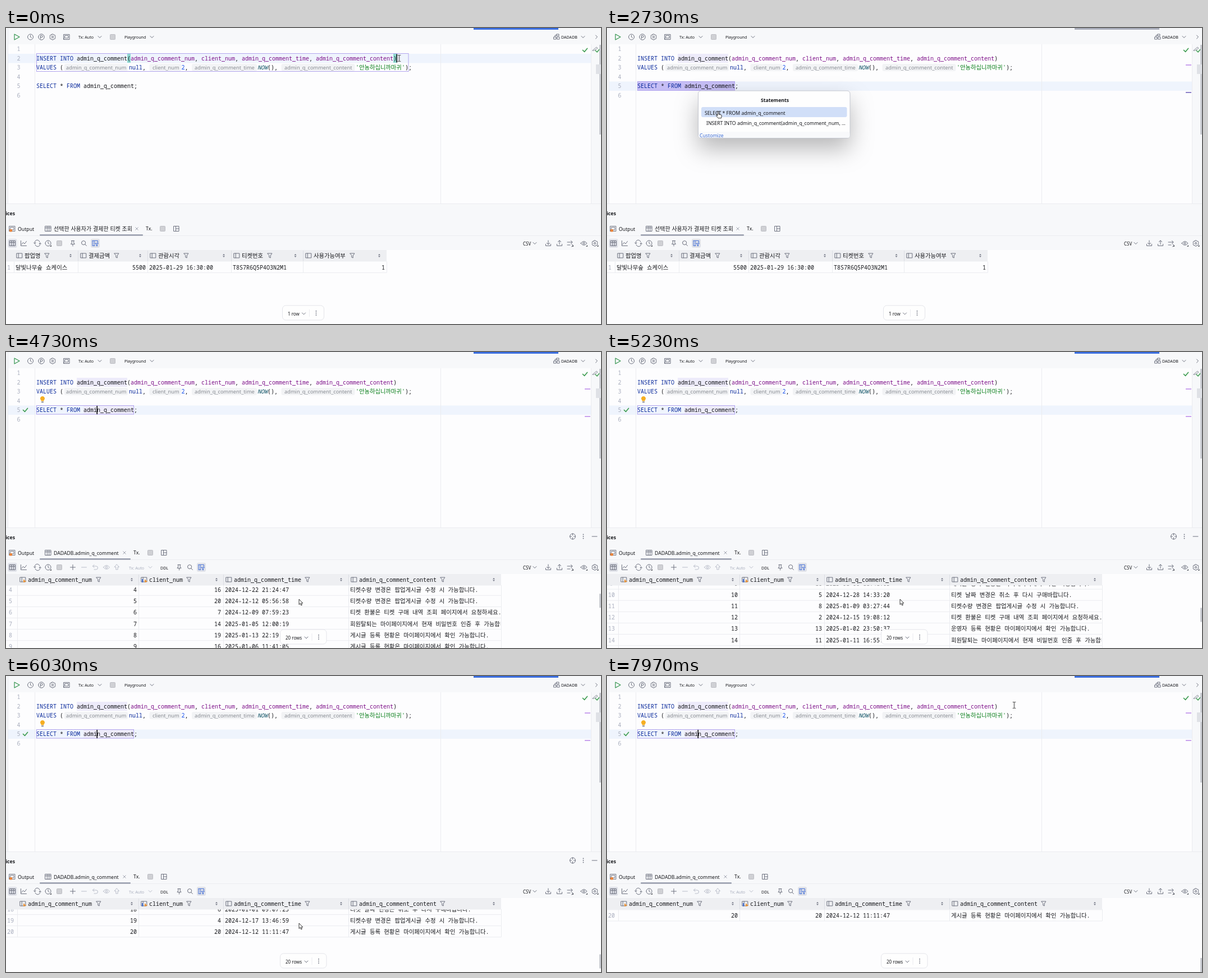
Recreate the animation shown at these times as an HTML page. Size 1060 px wide and 528 px high, loop 8 s.

```html
<!DOCTYPE html>
<html lang="ko">
<head>
<meta charset="utf-8">
<title>Query console</title>
<style>
html, body { margin: 0; width: 100%; height: 100%; overflow: hidden; background: #fdfdfe; }
svg { display: block; width: 1060px; height: 528px; }
text { white-space: pre; fill: #17181c; }
.mono { font: 10px "Noto Sans Mono", "Liberation Mono", monospace; }
.ko { font: 10.4px "Noto Sans Mono", "Noto Sans CJK KR", "Noto Sans CJK", monospace; }
.kh { font: 10.3px "Noto Sans CJK KR", "Noto Sans CJK", sans-serif; }
.tab { font: 10px "Noto Sans CJK KR", "Noto Sans CJK", sans-serif; }
.ui { font: 8.7px "Noto Sans", "Open Sans", sans-serif; }
.sm { font: 7.1px "Noto Sans", "Open Sans", sans-serif; }
.md { font: 8px "Noto Sans", "Open Sans", sans-serif; }
.hint { font: 9.25px "Noto Sans", "Open Sans", sans-serif; fill: #868a91; }
.bold { font-weight: 700; }
.dim { fill: #a8adbd; }
.end { text-anchor: end; }
.mid { text-anchor: middle; }
.kw { fill: #0a2a9c; }
.col { fill: #7d0f88; }
.str { fill: #067d17; }
.num { fill: #1750eb; }
.link { fill: #3f6fd6; }
.fn { font-style: italic; fill: #00485c; }
.ic { fill: none; stroke: #6c707e; stroke-width: 1; stroke-linejoin: round; stroke-linecap: round; }
.popup-box { filter: drop-shadow(0 19px 20px rgba(0, 0, 0, .27)); }
#mouse { animation: move 8s linear infinite; }
#rows { animation: scroll 8s linear infinite; }
#thumb { animation: thumb 8s linear infinite; }
.blink { animation: blink 1s step-end -.35s infinite; }
@keyframes blink { 0% { opacity: 1 } 50%, 100% { opacity: 0 } }
@keyframes scroll {
  0%, 54% { transform: translateY(0) }
  59.125% { transform: translateY(-62.8px) }
  70% { transform: translateY(-257.1px) }
  77%, 100% { transform: translateY(-381.9px) }
}
@keyframes thumb {
  0%, 54% { transform: translateY(0) }
  59.125% { transform: translateY(14.2px) }
  70% { transform: translateY(58px) }
  77%, 100% { transform: translateY(86px) }
}
@keyframes move {
  0% { transform: translate(700.5px, 54px) }
  4% { transform: translate(700.5px, 54px); animation-timing-function: ease-in-out }
  11% { transform: translate(162px, 102px) }
  15% { transform: translate(162px, 102px); animation-timing-function: ease-in }
  17.875% { transform: translate(148.5px, 97px); animation-timing-function: ease-out }
  23.5% { transform: translate(19px, 16px) }
  28% { transform: translate(19px, 16px); animation-timing-function: ease-in-out }
  33.5%, 44.5% { transform: translate(198px, 149px); animation-timing-function: ease-in-out }
  52% { transform: translate(522px, 441px) }
  87% { transform: translate(522px, 441px); animation-timing-function: ease-in-out }
  98%, 100% { transform: translate(725.5px, 52px) }
}
</style>
</head>
<body>
<script>
const LOOP = 8000, CLICK = 1120, OPEN = 2050, CLOSE = 3530, DONE = 3750;

// Time windows in ms during which each group is visible
const phases = {
  line2: [[0, CLICK]],
  caret2: [[0, 500], [1000, CLICK]],
  line5: [[CLICK, LOOP]],
  caret5: [[CLICK, 1620]],
  insertBox: [[0, OPEN]],
  popup: [[OPEN, CLOSE]],
  focus: [[0, OPEN], [CLOSE, LOOP]],
  selectBox: [[CLOSE, LOOP]],
  before: [[0, DONE]],
  after: [[DONE, LOOP]],
  bulb: [[4250, LOOP]],
  hover: [[3900, 7290]],
  ibeam: [[0, 1800], [CLOSE, 3900], [7290, LOOP]],
  arrow: [[1800, 2560], [3900, 7290]],
  hand: [[2560, CLOSE]]
};
const pct = t => t / LOOP * 100 + '%';
const css = Object.entries(phases).map(([name, spans]) => {
  const first = spans[0][0] ? '0%{visibility:hidden}' : '';
  const steps = spans.map(([a, b]) =>
    `${pct(a)}{visibility:visible}` + (b < LOOP ? `${pct(b)}{visibility:hidden}` : '')).join('');
  return `@keyframes ${name}{${first}${steps}}.${name}{animation:${name} 8s step-end infinite}`;
}).join('\n');
document.head.appendChild(document.createElement('style')).textContent = css;

const ring = r => `M${-r} 0a${r} ${r} 0 1 0 ${2 * r} 0a${r} ${r} 0 1 0 ${-2 * r} 0`;
const shapes = {
  run: 'M-4-5L5 0L-4 5Z',
  clock: ring(5) + 'M0-3V0L2 1.4',
  plan: ring(5.2) + 'M-1.5 3V-2.7H.6a1.7 1.7 0 0 1 0 3.4H-1.5',
  gear: 'M-1.2-5H1.2L2-3.5L4-3.6L5-1.4L4.1 0L5 1.4L4 3.6L2 3.5L1.2 5H-1.2L-2 3.5L-4 3.6L-5 1.4L-4.1 0L-5-1.4L-4-3.6L-2-3.5Z' + ring(1.6),
  frame: 'M-5-4.5H5V4.5H-5ZM-3-2.5H3V2H-3ZM-5 2V4.5',
  chev: 'M-3-1.5L0 1.5L3-1.5',
  next: 'M-1.5-3L1.5 0L-1.5 3',
  nodes: 'M-5 0H-1V4H-5ZM1 0H5V4H1ZM0-5H4V-2H0ZM-3 0V-3H0',
  tick: 'M-4 0L-1 3L4-3',
  pen: 'M-5 3L2-3L4-1L-2 3Z',
  funnel: 'M-4-4H4L1.2 0V4L-1.2 3V0Z',
  column: 'M-4.8-4H4.8V4H-4.8ZM-1.8-4V4',
  table: 'M-5-4.5H5V4.5H-5ZM-5-1.5H5M-1.7-4.5V4.5M1.7-4.5V4.5',
  layout: 'M-4.5-4.5H4.5V4.5H-4.5ZM-1-4.5V4.5M-1 0H4.5',
  chart: 'M-5-4.5V4.5H5M-3.5 2L-1-1.5L1.5 1L5-3.5',
  reload: 'M-4.7 0A4.5 4.5 0 0 1 4-2.5M4.7 0A4.5 4.5 0 0 1-4 2.5M-6.5-1L-4.7 1L-3-1M3 1L4.7-1L6.5 1',
  pin: 'M-2.5-4.5H2.5M-1.7-4.5V-1L-3.5 1.5H3.5L1.7-1V-4.5M0 1.5V5',
  search: 'M-4.5-.8a3.6 3.6 0 1 0 7.2 0a3.6 3.6 0 1 0-7.2 0M1.8 1.9L4.5 4.6',
  sift: 'M-5-4.5H4.5V-1M-5-4.5V4.5H-1M-2-4.5V4.5M0 0H5.5L3.5 2.3V5L2 4.5V2.3Z',
  plus: 'M-4.5 0H4.5M0-4.5V4.5',
  minus: 'M-4.5 0H4.5',
  undo: 'M-2-4.5L-4.5-2L-2 .5M-4.5-2H1.5a3 3 0 0 1 0 6H-2',
  eye: 'M-5.5 0Q0-7 5.5 0Q0 7-5.5 0Z' + ring(1.7),
  up: 'M0-5L4-.5H1.7V4H-1.7V-.5H-4Z',
  load: 'M0-5V2M-2.7-.5L0 2L2.7-.5M-4.5 1.5V4.5H4.5V1.5',
  save: 'M0 2V-5M-2.7-2.5L0-5L2.7-2.5M-4.5 1.5V4.5H4.5V1.5',
  swap: 'M-5-2H4M1.5-4.5L4-2L1.5 .5M0 3H-5M2.5 1L5 3.5L2.5 6',
  cross: 'M-2.3-2.3L2.3 2.3M2.3-2.3L-2.3 2.3',
  target: ring(5) + 'M0-5V-2M0 5V2M-5 0H-2M5 0H2'
};
const icon = (name, x, y, color = '#6c707e', width = 1) =>
  `<path class="ic" transform="translate(${x} ${y})" d="${shapes[name]}" style="stroke:${color};stroke-width:${width}"/>`;
const text = (x, y, s, cls = 'ui') => `<text x="${x}" y="${y + 3.5}" class="${cls}">${s}</text>`;
const rect = (x, y, w, h, fill, more = '') =>
  `<rect x="${x}" y="${y}" width="${w}" height="${h}" fill="${fill}" ${more}/>`;
const line = (x1, y1, x2, y2, color = '#ebecf0') =>
  `<path d="M${x1} ${y1}L${x2} ${y2}" stroke="${color}" fill="none"/>`;
const group = (phase, ...parts) => `<g class="${phase}">${parts.join('')}</g>`;
const span = (cls, s) => `<tspan class="${cls}">${s}</tspan>`;
const stop = (x, y) => rect(x - 4.5, y - 4.5, 9, 9, '#cfd0d4', 'rx="1" stroke="#bcbdc3"');
const dots = (x, y) => [-3.5, 0, 3.5].map(d => `<circle cx="${x}" cy="${y + d}" r=".9" fill="#6c707e"/>`).join('');
const sorter = (x, y) => `<path transform="translate(${x} ${y})" d="M-2-.8L0-3L2-.8ZM-2 .8L0 3L2 .8Z" fill="#6c707e"/>`;
// Small corner mark of a button that opens a menu
const more = (x, y) => `<path transform="translate(${x} ${y})" d="M6 3V6H3Z" fill="#55585f"/>`;
const outline = (x, y, w, h) => rect(x, y, w, h, 'none', 'stroke="#b3a6ee"');
const tint = (x, y) => rect(x, y, 90, 16, '#edebfa');

const PANEL = '#f7f8fa', GREEN = '#3f9d52';

function backdrop() {
  return rect(0, 0, 1060, 528, '#fdfdfe') + rect(0, 0, 1060, 29, PANEL) +
    rect(0, 29, 3, 285, PANEL) + rect(1043, 29, 17, 285, PANEL) + line(3.5, 0, 3.5, 313) +
    group('line2', rect(4, 46, 1038, 16.5, '#eff4fd')) +
    group('line5', rect(4, 95.5, 1038, 16.5, '#eff4fd')) +
    line(51.5, 29, 51.5, 313) + line(774.5, 29, 774.5, 313) + line(1042.5, 29, 1042.5, 313) +
    rect(833, 0, 151, 3, '#a9adba') + group('focus', rect(833, 0, 151, 3, '#3a6ee0'));
}

function topBar() {
  return icon('run', 19, 16, '#369650', 1.2) + icon('clock', 43.5, 16) + icon('plan', 63, 16) +
    icon('gear', 83, 16) + icon('frame', 108, 16) + text(129, 15.5, 'Tx: Auto', 'sm') + icon('chev', 167, 16) +
    stop(190, 16) + text(211, 15.5, 'Playground', 'sm') + icon('chev', 260, 16) +
    icon('nodes', 981, 16) + text(989, 15.5, 'DADADB', 'sm') + icon('chev', 1028, 16) + icon('next', 1052, 16) +
    icon('tick', 1031.5, 39.5, GREEN, 1.7) + icon('pen', 1050, 37, '#8b8f9a') + icon('tick', 1054, 40, GREEN, 1.5) +
    rect(1057, 30, 3, 160, '#c8cad0') + rect(1051, 65, 9, 17, '#dfe1e6');
}

function hints() {
  return [[104, 113, 107, 'admin_q_comment_num'], [255.5, 57, 261, 'client_num'],
    [331, 116, 336, 'admin_q_comment_time'], [490.5, 131, 496, 'admin_q_comment_content']]
    .map(([left, w, x, s]) => rect(left, 64, w, 13, '#f2f3f5', 'rx="3"') + text(x, 70, s, 'hint')).join('');
}

function editor() {
  const numbers = [1, 2, 3, 4, 5, 6].map(n => text(22.5, 21 + n * 16.5, n, 'mono dim mid')).join('');
  const marks = rect(1031, 65, 10, 2, '#c9a2ee') + rect(1031, 114, 10, 2, '#c9a2ee');
  return numbers +
    group('line2', rect(216, 46, 6, 16, '#8fd8d2'), rect(690, 46, 6, 16, '#8fd8d2')) +
    group('line5', tint(126, 46), tint(138, 95.5), marks) +
    group('popup', rect(54, 95, 174, 16.5, '#c6bef5'), outline(54.5, 95.5, 173, 16), rect(1031, 114, 10, 2, '#8c80c8')) +
    group('insertBox', outline(54.5, 45.5, 662.5, 32)) +
    group('selectBox', outline(54.5, 95.5, 173, 15.5)) +
    text(54, 54, span('kw', 'INSERT INTO') + ' admin_q_comment(' + span('col', 'admin_q_comment_num') + ', ' +
      span('col', 'client_num') + ', ' + span('col', 'admin_q_comment_time') + ', ' +
      span('col', 'admin_q_comment_content') + ')', 'mono') +
    text(54, 70.5, span('kw', 'VALUES') + ' (', 'mono') + hints() +
    text(219, 70.5, span('kw', 'null') + ',', 'mono') + text(312.5, 70.5, span('num', '2') + ',', 'mono') +
    text(448, 70.5, span('fn', 'NOW') + '(),', 'mono') + text(623, 70.5, "'", 'mono str') +
    text(629, 70.5, '안농하십니까마귀', 'kh str') + text(705, 70.5, span('str', "'") + ');', 'mono') +
    text(54, 103.5, span('kw', 'SELECT') + ' * ' + span('kw', 'FROM') + ' admin_q_comment;', 'mono') +
    group('caret2', rect(695.5, 46.5, 1.5, 15, '#000')) +
    group('caret5', rect(161.5, 96, 1.5, 15, '#000')) +
    group('selectBox', group('blink', rect(161.5, 96, 1.5, 15, '#000'))) +
    group('after', icon('tick', 34.5, 103.5, GREEN, 1.7)) +
    group('bulb', '<path d="M62.5 87.5V86A4 4 0 1 1 67.5 86V87.5Z" fill="#f5ae22"/>', rect(63, 88.3, 4, 2, '#8a8d96'));
}

function popup() {
  return group('popup',
    rect(162.5, 112, 270.5, 84.5, '#fefefe', 'rx="5" stroke="#c4c7d0" class="popup-box"'),
    rect(163, 185, 269.5, 11, '#f8f9fb', 'rx="4"'), rect(168, 141, 259.5, 18, '#d1dff8', 'rx="3"'),
    text(299, 128, 'Statements', 'ui bold mid'),
    text(174, 151, 'SELECT * FROM admin_q_comment'),
    text(177, 169, 'INSERT INTO admin_q_comment(admin_q_comment_num, ...'),
    text(165, 191, 'Customize', 'ui link'));
}

// Tab strip parts shift with the width of the open tab
function tabStrip(title, cls, close) {
  return text(85, 358, title, cls) + icon('cross', close, 358, '#a0a4b0') +
    rect(60, 368.3, close - 49, 2.2, '#8f95a6', 'rx="1"') + text(close + 16, 357.5, 'Tx.', 'ui') +
    stop(close + 46, 358) + icon('layout', close + 70.5, 358);
}

function panel() {
  const y = 384, gray = '#b9bdc9', lit = x => rect(x - 8, y - 8, 16, 16, '#dfe1e8', 'rx="3"');
  return rect(0, 314, 1060, 82, PANEL) + line(0, 313.5, 1060, 313.5) + line(0, 370.5, 1060, 370.5) +
    text(16, 330, 'ices', 'ui bold end') +
    group('hover', icon('target', 1009.5, 329), dots(1028.5, 329), icon('minus', 1048.5, 329)) +
    icon('frame', 11, 358, '#777b88') + rect(6, 359, 5, 4.5, '#e8843c', 'rx="1"') +
    text(21, 358, 'Output') + icon('table', 75, 358) +
    group('before', tabStrip('선택한 사용자가 결제한 티켓 조회', 'tab', 233)) +
    group('after', tabStrip('DADADB.admin_q_comment', 'ui', 211)) +
    lit(11.5) + icon('table', 11.5, y) + icon('chart', 31.5, y) + icon('reload', 56, y) +
    icon('clock', 75, y) + more(75, y) + stop(95, y) +
    group('before', icon('pin', 119, y), icon('search', 139, y), lit(159), icon('sift', 159, y, '#4571d8')) +
    group('after', icon('plus', 119, y), icon('minus', 139, y, gray), icon('undo', 159, y, gray),
      icon('eye', 179, y, gray), icon('up', 197.5, y, gray), text(219, y, 'Tx: Auto', 'sm dim'),
      icon('chev', 257, y, gray), text(275, y, 'DDL', 'sm'), icon('pin', 308.5, y), icon('search', 328, y),
      lit(348), icon('sift', 348, y, '#4571d8')) +
    text(921, y, 'CSV', 'md') + icon('chev', 942, y) + icon('load', 966, y) + icon('save', 986, y) +
    icon('swap', 1005, y) + more(1005, y) + icon('eye', 1029.5, y) + more(1030, y) +
    icon('gear', 1049, y) + more(1049.5, y);
}

// Each column: left edge, title, funnel x, sorter x
function header(cols, right, cls, badge = () => '') {
  return rect(0, 396, right, 20.5, '#eeeff2') + cols.map(([x, title, funnel, sort], i) =>
    (i ? line(x + .5, 397, x + .5, 416, '#dcdee4') : '') + icon('column', x + 10, 406) +
    text(x + 19, 406.5, title, cls) + icon('funnel', funnel, 406) + sorter(sort, 406) + badge(x, i)).join('');
}
const grid = (xs, right, top, h) => line(0, top + h, right, top + h) +
  xs.concat(right).map(x => line(x + .5, top, x + .5, top + h)).join('');

function pager(x, w, label) {
  return rect(x + .5, 495, w, 26, '#fefefe', 'rx="6" stroke="#e4e5ea"') + text(x + 10, 509, label, 'md') +
    icon('chev', x + w - 35.5, 509.5) + line(x + w - 25.5, 502, x + w - 25.5, 515) + dots(x + w - 13.5, 508.5);
}

function ticketTable() {
  const y = 427.5;
  const cols = [[14, '팝업명', 73, 115], [128, '결제금액', 197, 239], [252, '관람시각', 321, 388],
    [401, '티켓번호', 470, 515.5], [529, '사용가능여부', 617, 665]];
  return header(cols, 678, 'kh') + grid(cols.map(c => c[0]), 678, 416.5, 20) +
    text(5, y, 1, 'mono dim mid') + text(17, y, '달빛나무숲 쇼케이스', 'ko') + text(249, y, '5500', 'mono end') +
    text(255, y, '2025-01-29 16:30:00', 'mono') + text(404, y, 'T8S7R6Q5P4O3N2M1', 'mono') +
    text(675, y, '1', 'mono end') + pager(492, 74, '1 row');
}

const notes = {
  a: '티켓수량 변경은 팝업게시글 수정 시 가능합니다.',
  b: '티켓 환불은 티켓 구매 내역 조회 페이지에서 요청하세요.',
  c: '회원탈퇴는 마이페이지에서 현재 비밀번호 인증 후 가능합니다.',
  d: '게시글 등록 현황은 마이페이지에서 확인 가능합니다.',
  e: '티켓 날짜 변경은 취소 후 다시 구매바랍니다.',
  f: '운영자 등록 현황은 마이페이지에서 확인 가능합니다.'
};
const comments = `3 2025-01-08 10:21:36 e
12 2024-12-19 18:40:02 b
9 2025-01-03 08:15:51 d
16 2024-12-22 21:24:47 a
20 2024-12-12 05:56:58 a
7 2024-12-09 07:59:23 b
14 2025-01-05 12:00:19 c
19 2025-01-13 22:19:34 d
16 2025-01-06 11:41:05 d
5 2024-12-28 14:33:20 e
8 2025-01-09 03:27:44 a
2 2024-12-15 19:08:12 b
13 2025-01-02 23:50:37 f
11 2025-01-11 16:55:48 c
1 2024-12-23 02:31:06 c
1 2024-12-22 06:26:34 e
17 2024-12-31 09:09:11 f
6 2025-01-01 09:07:25 e
4 2024-12-17 13:46:59 a
20 2024-12-12 11:11:47 d`.split('\n').map(r => r.split(' '));

function commentTable() {
  const cols = [[20, 'admin_q_comment_num', 165, 224], [236, 'client_num', 326, 375],
    [387, 'admin_q_comment_time', 537, 597], [610, 'admin_q_comment_content', 778, 869]];
  const xs = cols.map(c => c[0]);
  const keys = (x, i) => i > 1 ? '' : rect(x + 11, 406, 2, 5, '#e8943a') + rect(x + 13, 408, 2.5, 2, '#e8943a') +
    (i ? rect(x + 6, 405, 2, 6, '#4571d8') : '');
  const rows = comments.map(([client, day, time, note], i) => {
    const y = 427.5 + i * 20.1;
    return grid(xs, 882, y - 10.6, 20.1) + text(8, y, i + 1, 'mono dim mid') + text(233, y, i + 1, 'mono end') +
      text(383, y, client, 'mono end') + text(390, y, day + ' ' + time, 'mono') +
      `<g clip-path="url(#cell)">${text(613, y, notes[note], 'ko')}</g>`;
  }).join('');
  return `<g clip-path="url(#view)"><g id="rows">${rows}</g></g>` + header(cols, 882, 'mono', keys) +
    `<g id="thumb">${rect(1057, 417, 3, 25, '#c8cad0')}</g>` + pager(488, 82.5, '20 rows');
}

function pointer() {
  return '<g id="mouse">' +
    group('ibeam', '<path d="M-2.5-5.5H-.7L0-4.8L.7-5.5H2.5M0-4.8V4.8M-2.5 5.5H-.7L0 4.8L.7 5.5H2.5" fill="none" stroke="#222"/>') +
    group('arrow', '<path d="M0 0V9.5L2.2 7.5L3.8 11L5.4 10.2L3.9 7H6.8Z" fill="#fff" stroke="#222" stroke-width=".9"/>') +
    group('hand', '<path d="M-1 1a1 1 0 0 1 2 0V5L5 5.8Q6.5 6.2 6.3 8L5.5 11.8H0L-3.5 7.5Q-3.6 6-2.2 6.5L-1 7.6Z" fill="#fff" stroke="#222" stroke-width=".9"/>') +
    '</g>';
}

document.body.innerHTML = `<svg viewBox="0 0 1060 528" xmlns="http://www.w3.org/2000/svg">
<defs><clipPath id="view"><rect y="416" width="1060" height="112"/></clipPath>
<clipPath id="cell"><rect x="611" y="400" width="270" height="450"/></clipPath></defs>` +
  backdrop() + topBar() + editor() + panel() + group('before', ticketTable()) +
  group('after', commentTable()) + popup() + pointer() + '</svg>';
</script>
</body>
</html>
```
